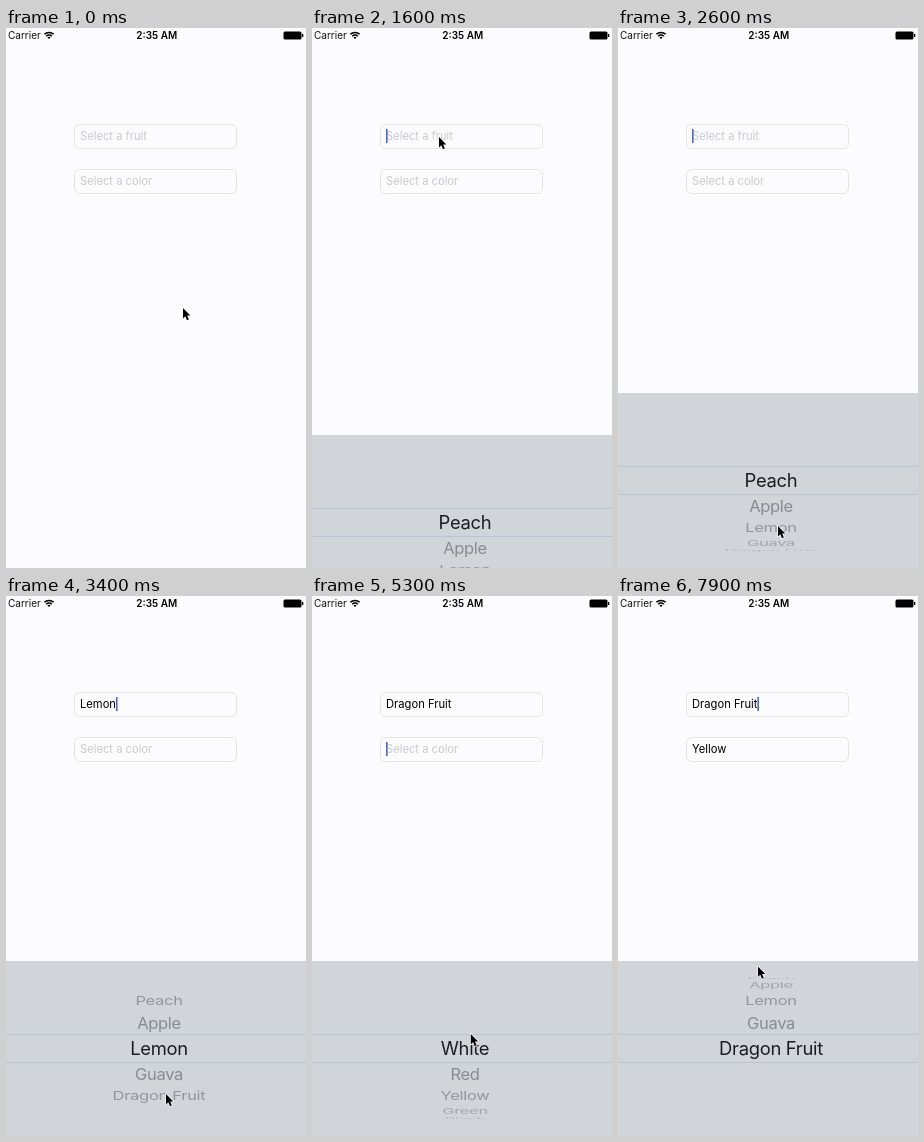
Write an HTML page with a canvas that moves like this. It is 300 px wide and 540 px high and loops after 8000 ms.

```html
<!DOCTYPE html>
<html lang="en">
<head>
<meta charset="utf-8">
<title>Picker text fields</title>
<style>
  html, body { margin: 0; width: 100%; height: 100%; overflow: hidden; background: #fcfcfe; }
  canvas { display: block; width: 300px; height: 540px; }
</style>
</head>
<body>
<canvas></canvas>
<script>
const LOOP = 8000, STEP = 100, W = 300, H = 540;
const FONT = 'Inter, "Liberation Sans", sans-serif';
const FRUITS = ['Peach', 'Apple', 'Lemon', 'Guava', 'Dragon Fruit'];
const COLORS = ['White', 'Red', 'Yellow', 'Green', 'Black'];

// Pointer stops: time, x, y
const PATH = [
  [0, 177, 280], [900, 128, 112], [1000, 128, 112], [1100, 127, 109],
  [1750, 127, 109], [2500, 160, 498], [3650, 160, 498], [4310, 153, 152],
  [4800, 153, 152], [5480, 160, 498], [5700, 157, 498], [6500, 157, 498],
  [7300, 127, 109], [7500, 127, 109], [8100, 144.5, 462]
];
// Taps on the fields and the ends of the wheel turns
const TAP_FRUIT = 1450, TAP_COLOR = 4650, TAP_BACK = 7500;
const GOT_LEMON = 3000, GOT_DRAGON = 3700, GOT_YELLOW = 6000;
const TURN = 300;
const CARET_RESETS = [TAP_FRUIT, GOT_LEMON, GOT_DRAGON, TAP_COLOR, GOT_YELLOW, TAP_BACK];

const canvas = document.querySelector('canvas');
const ctx = canvas.getContext('2d');
const ratio = window.devicePixelRatio || 1;
canvas.width = W * ratio;
canvas.height = H * ratio;

const clamp = u => Math.max(0, Math.min(1, u));
const smooth = u => u * u * (3 - 2 * u);
const ramp = (t, from, to) => smooth(clamp((t - from) / (to - from)));
const turn = (t, end) => 2 * ramp(t, end - TURN, end);

function text(str, x, y, size, color, { weight = 400, align = 'left', spacing = 0 } = {}) {
  ctx.font = `${weight} ${size}px ${FONT}`;
  ctx.letterSpacing = spacing + 'px';
  ctx.textAlign = align;
  ctx.fillStyle = color;
  ctx.fillText(str, x, y);
}

function statusBar() {
  text('Carrier', 2, 11, 10, '#111');
  text('2:35 AM', 150.7, 11, 10, '#000', { weight: 600, align: 'center' });

  ctx.strokeStyle = ctx.fillStyle = '#000';
  ctx.lineWidth = 1.5;
  for (const r of [4, 6.6]) {
    ctx.beginPath();
    ctx.arc(43, 11, r, -Math.PI * 0.75, -Math.PI * 0.25);
    ctx.stroke();
  }
  ctx.beginPath();
  ctx.moveTo(43, 11);
  ctx.arc(43, 11, 2.2, -Math.PI * 0.75, -Math.PI * 0.25);
  ctx.fill();

  ctx.beginPath();
  ctx.roundRect(277.5, 3.5, 18, 8, 1.5);
  ctx.fill();
  ctx.fillRect(296, 6, 1.3, 3);
}

function field(y, value, hint, caret) {
  ctx.strokeStyle = '#e4e4e4';
  ctx.lineWidth = 1;
  ctx.beginPath();
  ctx.roundRect(68.5, y + 0.5, 162, 24, 5);
  ctx.stroke();
  text(value || hint, 74, y + 16, 11.2, value ? '#000' : '#c9c9ce');
  if (caret) {
    const x = value ? 74 + ctx.measureText(value).width : 74;
    ctx.fillStyle = '#4a6cc8';
    ctx.fillRect(x, y + 5, 1.6, 14);
  }
}

// Rows lie on a cylinder seen from the front
function wheel(items, pos, mid, magnified) {
  items.forEach((item, i) => {
    const angle = (i - pos) * 0.37, flat = Math.cos(angle);
    if (Math.abs(angle) > 1.5) return;
    ctx.save();
    ctx.translate(153, mid + 70.5 * Math.sin(angle));
    ctx.scale(1, flat);
    const opts = { align: 'center', spacing: -0.3 };
    if (magnified) text(item, 0, 6.5, 18.4, '#1c1d20', opts);
    else text(item, 0, 6, 16.5, `rgba(80, 84, 90, ${0.2 + 0.4 * flat})`, opts);
    ctx.restore();
  });
}

function picker(top, items, pos) {
  const band = top + 73, bandH = 28, mid = top + 87.5;
  ctx.fillStyle = '#d1d5da';
  ctx.fillRect(0, top, W, H);

  ctx.save();
  ctx.beginPath();
  ctx.rect(0, top, W, 73);
  ctx.rect(0, band + bandH, W, 75);
  ctx.clip();
  wheel(items, pos, mid, false);
  ctx.restore();

  ctx.save();
  ctx.beginPath();
  ctx.rect(0, band, W, bandH);
  ctx.clip();
  wheel(items, pos, mid, true);
  ctx.restore();

  ctx.fillStyle = '#b8c4d4';
  ctx.fillRect(0, band, W, 1);
  ctx.fillRect(0, band + bandH, W, 1);
}

function pointer(t) {
  const i = PATH.findIndex(p => p[0] > t);
  const [t0, x0, y0] = PATH[i - 1], [t1, x1, y1] = PATH[i];
  const u = ramp(t, t0, t1);
  ctx.save();
  ctx.translate(x0 + (x1 - x0) * u, y0 + (y1 - y0) * u);
  const arrow = new Path2D('M0 0V10.4L2.3 8.2L4 12.2L5.8 11.4L4.2 7.5H7.3Z');
  ctx.lineJoin = 'round';
  ctx.lineWidth = 1.6;
  ctx.strokeStyle = '#fcfcfe';
  ctx.stroke(arrow);
  ctx.fillStyle = '#000';
  ctx.fill(arrow);
  ctx.restore();
}

function draw(t) {
  ctx.setTransform(ratio, 0, 0, ratio, 0, 0);
  ctx.fillStyle = '#fcfcfe';
  ctx.fillRect(0, 0, W, H);
  statusBar();

  const onColor = t >= TAP_COLOR && t < TAP_BACK;
  const reset = CARET_RESETS.filter(r => r <= t).pop();
  const blink = reset !== undefined && (t - reset) % 1000 < 700;
  const fruit = t >= GOT_DRAGON ? 'Dragon Fruit' : t >= GOT_LEMON ? 'Lemon' : '';
  field(96, fruit, 'Select a fruit', blink && !onColor);
  field(141, t >= GOT_YELLOW ? 'Yellow' : '', 'Select a color', blink && onColor);

  if (t > TAP_FRUIT) {
    const s = (t - TAP_FRUIT) * 0.01826;
    const top = Math.round(365 + 175 * Math.exp(-s) * (1 + s));
    if (onColor) picker(top, COLORS, turn(t, GOT_YELLOW));
    else picker(top, FRUITS, turn(t, GOT_LEMON) + turn(t, GOT_DRAGON));
  }
  pointer(t);
}

const start = performance.now();
function tick() {
  const t = (performance.now() - start) % LOOP;
  draw(Math.floor(t / STEP) * STEP);
  requestAnimationFrame(tick);
}
tick();
</script>
</body>
</html>
```
